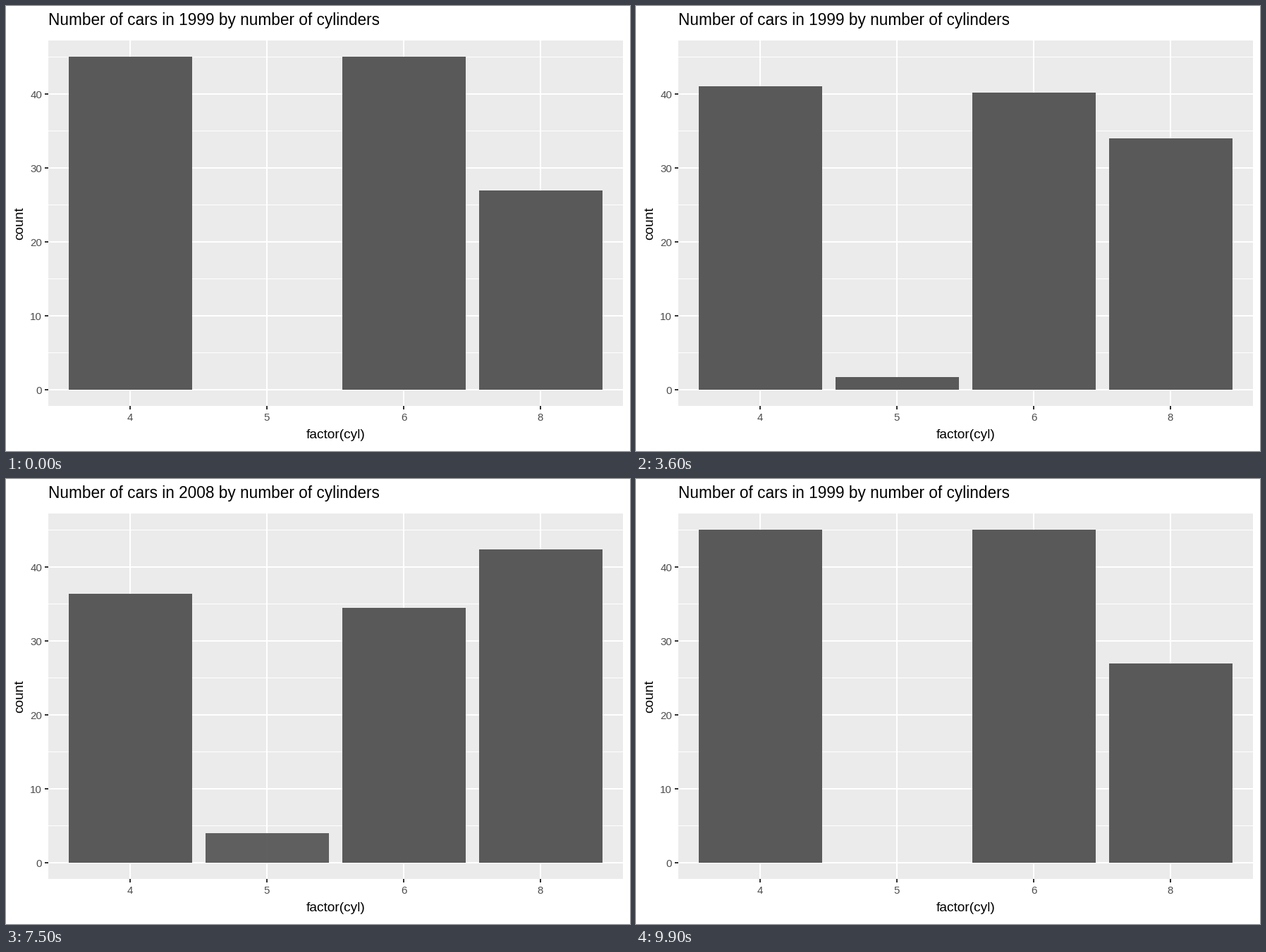
A matplotlib script for the animation above (10 s loop, 885 px wide and 632 px high).

```python
import matplotlib.pyplot as plt
from matplotlib.animation import FuncAnimation
from matplotlib.patches import Rectangle

W, H, DPI = 885, 632, 100
FRAMES, INTERVAL = 100, 100
STEPS = 25                      # frames per transition
FORWARD, BACK = 25, 74          # frames on which the transitions begin

LEVELS = ["4", "5", "6", "8"]
COUNTS = {1999: [45, 0, 45, 27], 2008: [36, 4, 34, 43]}
TITLE = "Number of cars in {} by number of cylinders"

LEFT, TOP, RIGHT, BOTTOM = 60, 49, 875, 568
BASE = 545
CENTERS = [176 + 194 * i for i in range(4)]

plt.rcParams["font.family"] = "Liberation Sans"
fig = plt.figure(figsize=(W / DPI, H / DPI), dpi=DPI, facecolor="white")
ax = fig.add_axes([0, 0, 1, 1])
ax.set_xlim(0, W)
ax.set_ylim(H, 0)
ax.axis("off")


def box(x0, y0, x1, y1, color, z):
    rect = Rectangle((x0, y0), x1 - x0, y1 - y0, facecolor=color,
                     edgecolor="none", linewidth=0, antialiased=False, zorder=z)
    return ax.add_patch(rect)


def label(x, y, text, px, color="black", ha="center", rotation=0):
    return ax.text(x, y, text, fontsize=px * 72 / DPI, color=color, ha=ha,
                   va="baseline", rotation=rotation,
                   rotation_mode="anchor", zorder=5)


def grid_y(value):
    return BASE - 10.5 * value


def bar_top(value):
    return min(BASE, round(545.2 - 10.505 * value))


box(LEFT, TOP, RIGHT, BOTTOM, "#EBEBEB", 1)

for value in range(5, 50, 10):
    y = int(grid_y(value))
    box(LEFT, y, RIGHT, y + 1, "white", 2)

for value in range(0, 50, 10):
    y = grid_y(value)
    box(LEFT, y - 1, RIGHT, y + 1, "white", 2)
    box(LEFT - 5, y - 1, LEFT, y + 1, "#333333", 2)
    label(51.2, y + 6, str(value), 15, "#4D4D4D", ha="right")

for x, level in zip(CENTERS, LEVELS):
    box(x - 1, TOP, x + 1, BOTTOM, "white", 2)
    box(x - 1, BOTTOM, x + 1, BOTTOM + 5, "#333333", 2)
    label(x, 589, level, 15, "#4D4D4D")

label(467.5, 614, "factor(cyl)", 19.2)
label(24.5, 308.5, "count", 19.2, rotation=90)
title = label(60, 27, "", 22.6, ha="left")
bars = [box(x - 87, BASE, x + 88, BASE, "#595959", 3) for x in CENTERS]


def progress(frame, start):
    return min(max((frame - start) / STEPS, 0), 1)


def update(frame):
    returning = frame > BACK
    if returning:
        t, start, end = progress(frame, BACK), 2008, 1999
    else:
        t, start, end = progress(frame, FORWARD), 1999, 2008
    title.set_text(TITLE.format(start if t < 0.5 else end))

    for i, bar in enumerate(bars):
        a, b = COUNTS[start][i], COUNTS[end][i]
        # An emptied bar keeps its height and fades out.
        fading = returning and b == 0
        top = bar_top(a if fading else a + (b - a) * t)
        bar.set_y(top)
        bar.set_height(BASE - top)
        bar.set_alpha(1 - t if fading else 1)
        bar.set_visible(top < BASE and not (fading and t == 1))
    return [title, *bars]


def reset():
    return update(0)


anim = FuncAnimation(fig, update, frames=FRAMES, init_func=reset,
                     interval=INTERVAL, repeat=True, repeat_delay=0, blit=False)
plt.show()
```
